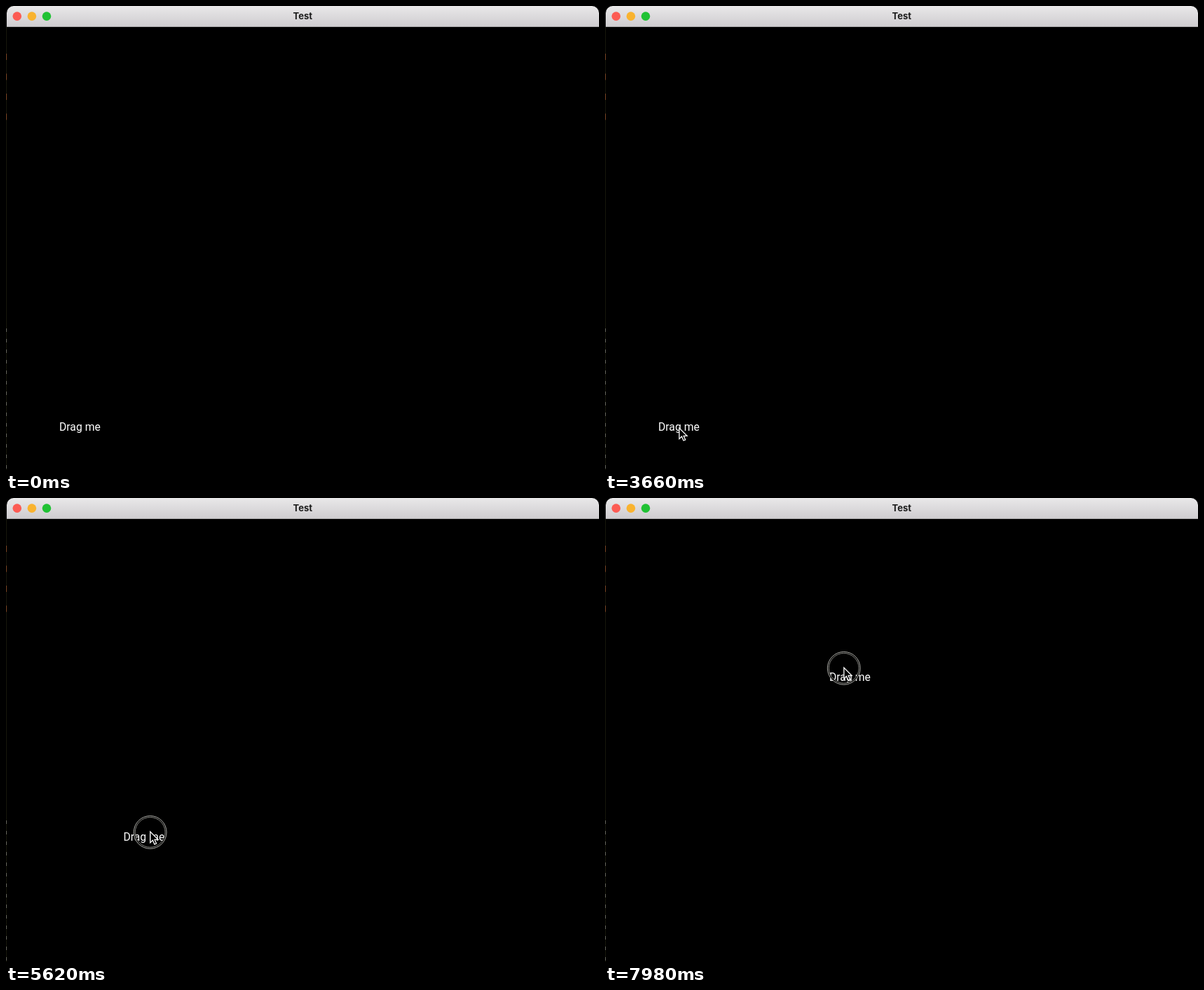
These frames come from a looping animation (846x662 px, 8 s). An HTML page with a canvas:

```html
<!DOCTYPE html>
<html lang="en">
<head>
<meta charset="utf-8">
<title>Test</title>
<style>
  html, body { margin: 0; height: 100%; overflow: hidden; background: #000; }
  canvas { display: block; }
</style>
</head>
<body>
<canvas id="stage" width="846" height="662"></canvas>
<script>
const ctx = document.getElementById('stage').getContext('2d');
const LOOP = 8000, PRESS = 4500, LABEL_DELAY = 100;
const HOVER = { x: 118, y: 553 }, REST = { x: 105, y: 601 };

// Pointer tip at a few moments; motion between them is a smooth curve.
const keys = [
  { t: 0, x: 720, y: 690 },
  { t: 1300, ...HOVER }, { t: 2500, ...HOVER },
  { t: 3240, ...REST }, { t: PRESS, ...REST },
  { t: 5160, x: 163, y: 523 },
  { t: 5900, x: 218, y: 461 }, { t: 6460, x: 220.3, y: 459 },
  { t: 7160, x: 288, y: 371 }, { t: 7260, x: 307, y: 342 },
  { t: 7880, x: 349, y: 257 }, { t: LOOP, x: 338, y: 238 }
];

const slope = (i, axis) =>
  (keys[i + 1][axis] - keys[i][axis]) / (keys[i + 1].t - keys[i].t);

// Monotone tangent: smooth, without overshoot.
function tangent(i, axis) {
  if (i === 0) return slope(0, axis);
  if (i === keys.length - 1) return slope(i - 1, axis);
  const a = slope(i - 1, axis), b = slope(i, axis);
  return a * b > 0 ? 2 * a * b / (a + b) : 0;
}

function pointerAt(t) {
  const i = keys.findLastIndex(key => key.t <= t);
  const from = keys[i], to = keys[i + 1], span = to.t - from.t;
  const u = (t - from.t) / span, v = 1 - u;
  const along = axis =>
    from[axis] * (1 + 2 * u) * v * v + tangent(i, axis) * span * u * v * v +
    to[axis] * u * u * (3 - 2 * u) - tangent(i + 1, axis) * span * u * u * v;
  return { x: along('x'), y: along('y') };
}

function circle(x, y, r) {
  ctx.beginPath();
  ctx.arc(x, y, r, 0, Math.PI * 2);
}

function drawWindow() {
  ctx.fillStyle = '#000';
  ctx.fillRect(0, 0, 846, 662);

  // Lines of code showing in a sliver of the window behind
  ctx.fillStyle = '#17170c';
  ctx.fillRect(0, 30, 1, 632);
  ctx.fillStyle = '#7a4424';
  for (let line = 0; line < 4; line++) ctx.fillRect(0, 68 + 28.5 * line, 1, 9);
  ctx.fillStyle = '#66665e';
  for (let y = 460; y < 660; y += 15) ctx.fillRect(0, y, 1, 5);

  const bar = ctx.createLinearGradient(0, 0, 0, 29);
  bar.addColorStop(0, '#e9e8e9');
  bar.addColorStop(1, '#cfcdd0');
  ctx.fillStyle = bar;
  ctx.beginPath();
  ctx.roundRect(1, 0, 845, 29, [10, 10, 0, 0]);
  ctx.fill();
  ctx.fillStyle = '#a9a8a9';
  ctx.fillRect(1, 29, 845, 1);

  ['#fc5b53', '#f9b32f', '#20c234'].forEach((color, i) => {
    ctx.fillStyle = color;
    circle(15.8 + 21.1 * i, 14.6, 6.3);
    ctx.fill();
  });

  ctx.fillStyle = '#1c1c1c';
  ctx.font = '700 13px Inter, sans-serif';
  ctx.textAlign = 'center';
  ctx.fillText('Test', 423.3, 19);
}

function drawLabel({ x, y }) {
  ctx.fillStyle = '#fff';
  ctx.font = '15.75px Roboto, sans-serif';
  ctx.textAlign = 'left';
  ctx.fillText('Drag me', x - 29, y + 4.5);
}

function strokeRing({ x, y }, radius, width, color) {
  ctx.lineWidth = width;
  ctx.strokeStyle = color;
  circle(x + 0.8, y + 1.8, radius);
  ctx.stroke();
}

function drawRing(tip) {
  strokeRing(tip, 22.4, 2.6, '#000');
  strokeRing(tip, 23.4, 0.85, '#cbcbc6');
  strokeRing(tip, 21.4, 0.75, '#b0b0aa');
}

function drawArrow({ x, y }) {
  ctx.save();
  ctx.translate(x + 0.9, y + 1);
  ctx.fillStyle = '#000';
  ctx.strokeStyle = '#fff';
  ctx.lineWidth = 1.3;
  const arrow = new Path2D('M0 0V15.6L3.6 12.2 6.1 18 8.8 16.9 6.3 11.3H11.2Z');
  ctx.fill(arrow);
  ctx.stroke(arrow);
  ctx.restore();
}

function frame() {
  const t = performance.now() % LOOP;
  const tip = pointerAt(t);
  drawWindow();
  drawLabel(pointerAt(Math.max(t - LABEL_DELAY, 0) < PRESS ? PRESS : t - LABEL_DELAY));
  if (t >= PRESS) drawRing(tip);
  drawArrow(tip);
  requestAnimationFrame(frame);
}
frame();
</script>
</body>
</html>
```
